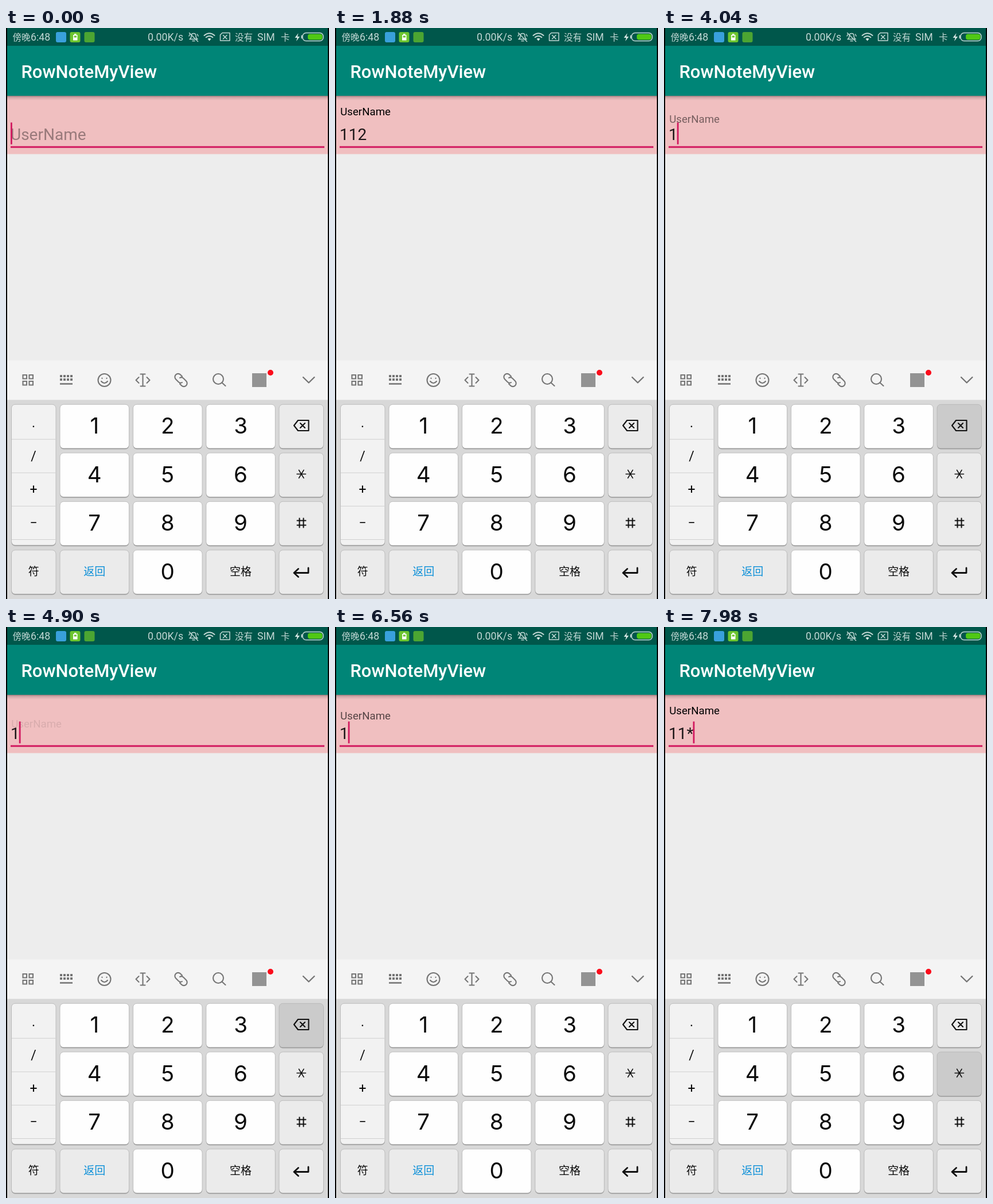
Write an HTML page that moves like this. It is 563 px wide and 994 px high and loops after 8 s.

```html
<!DOCTYPE html>
<html lang="zh">
<head>
<meta charset="utf-8">
<title>Floating label</title>
<style>
  html, body { margin: 0; width: 100%; height: 100%; overflow: hidden; background: #000; }
  svg { display: block; width: 563px; height: 994px; font-family: Roboto, "Noto Sans CJK SC", "Noto Sans CJK", sans-serif; }
  .line { fill: none; stroke-linecap: round; stroke-linejoin: round; }
  .status { fill: #c4d8d5; font-size: 17.7px; }
  .han { font-size: 15.6px; }
  .key { stroke: #b4b4b4; stroke-width: .8; }
  .digit { font: 400 38.5px Inter, sans-serif; }
  .digit, .word, .sign { text-anchor: middle; fill: #0a0a0a; }
  .word { font-size: 19px; }
  .sign { font-size: 23px; }
</style>
</head>
<body>
<svg viewBox="0 0 563 994" xmlns="http://www.w3.org/2000/svg">
  <defs>
    <linearGradient id="shade" x2="0" y2="1">
      <stop offset="0" stop-opacity=".36"/>
      <stop offset=".35" stop-opacity=".13"/>
      <stop offset="1" stop-opacity="0"/>
    </linearGradient>
  </defs>
  <rect width="563" height="994"/>
  <rect x="2" width="559" height="994" fill="#ededed"/>

  <!-- form -->
  <rect x="2" y="118" width="559" height="101.5" fill="#f0bfc0"/>
  <rect x="2" y="118" width="559" height="8" fill="url(#shade)"/>
  <text id="hint" x="8" y="195" font-size="28" fill-opacity=".36">UserName</text>
  <text id="value" x="8" y="195" font-size="28" fill="#1d1718"></text>
  <rect x="8" y="205.7" width="547" height="3" fill="#d2195f"/>
  <text id="label" x="9.2" y="152.4" font-size="18.7">UserName</text>
  <rect id="cursor" y="164.5" width="2.8" height="38" fill="#d2195f"/>

  <!-- bars -->
  <rect x="2" width="559" height="31" fill="#00574b"/>
  <rect x="2" y="31" width="559" height="87" fill="#008577"/>
  <text x="26.5" y="87" font-size="31" font-weight="500" fill="#fff">RowNoteMyView</text>

  <g class="status">
    <text class="han" x="11.5" y="21.5">傍晚</text>
    <text x="43" y="22">6:48</text>
    <text x="247" y="22">0.00K/s</text>
    <text class="han" x="399" y="21.5">没有</text>
    <text x="438" y="22">SIM</text>
    <text class="han" x="479" y="21.5">卡</text>
  </g>
  <rect x="87" y="7" width="18" height="18" rx="3" fill="#39a0dc"/>
  <rect x="111.5" y="7" width="18" height="18" rx="3" fill="#6cc52f"/>
  <path d="M117 12h2v-2h3.5v2h2v9.5h-7.5z" fill="#fff"/>
  <path d="M118.5 13.5h4.500v3h-4.500z" fill="#6cc52f"/>
  <rect x="136.5" y="7" width="18" height="18" rx="3" fill="#4ca532"/>
  <g class="line" stroke="#c4d8d5" stroke-width="1.5">
    <path d="M320 19.500q3-1.500 3-6 0-4 4-4t4 4q0 4.500 3 6zM325 22.500h4M319.500 8.500l15 15M320.500 11l-1.500 3M333.500 11l1.500 3"/>
    <path d="M345.500 13q9-7.500 18 0M348.700 16.300q5.800-4.500 11.600 0" stroke-width="2"/>
    <path d="M377 8.500h13v13.500h-16.500v-10zM378.500 12.500l6.500 6.500M385 12.500l-6.500 6.500"/>
    <rect x="517" y="8.5" width="36" height="14" rx="6"/>
    <path d="M515.500 13.500v4" stroke-width="2"/>
  </g>
  <path d="M351.500 19q3-2.500 6 0l-3 3.500zM509.500 9l-6 8h4l-1.500 6 6-8h-4z" fill="#d6e6e3"/>
  <rect x="526" y="10.5" width="25.5" height="10" rx="4" fill="#50c814"/>

  <!-- toolbar -->
  <rect x="2" y="578.5" width="559" height="69" fill="#f4f4f4"/>
  <g class="line" stroke="#757575" stroke-width="2.1">
    <path d="M29.500 604h6.500v6.500h-6.500zM40.500 604h6.500v6.500h-6.500zM29.500 615h6.500v6.500h-6.500zM40.500 615h6.500v6.500h-6.500z" stroke-linejoin="miter"/>
    <path d="M94 606h22M94 612h22" stroke-width="4" stroke-dasharray="4 2" stroke-linecap="butt"/>
    <path d="M94 619.500h22" stroke-width="2.6" stroke-linecap="butt"/>
    <circle cx="171.5" cy="613" r="11"/>
    <path d="M166 615q5.500 6.500 11 0M167.500 609.500v.5M175.500 609.500v.5"/>
    <path d="M231.500 608l-5 5 5 5M245.500 608l5 5-5 5M234.500 602.500h8M234.500 623.500h8M238.500 602.500v21"/>
    <path d="M307 606.500l-3-3a5.500 5.500 0 0 0-8 8l5 5q3 2.500 6 .5M303 619.500l3 3a5.500 5.500 0 0 0 8-8l-5-5q-3-2.500-6-.5"/>
    <circle cx="370" cy="611" r="9"/>
    <path d="M376.500 617.500l6 5.500"/>
    <path d="M518 608l9.700 9.500 9.700-9.500" stroke-width="2.4"/>
  </g>
  <rect x="429" y="601" width="25" height="24" fill="#939393"/>
  <circle cx="461" cy="600" r="5" fill="#fb0d1b"/>

  <!-- keyboard -->
  <rect x="2" y="647.5" width="559" height="347" fill="#d8d8d8"/>
  <g id="keys"></g>
  <g class="line" stroke="#111" stroke-width="2.1">
    <path d="M502 692l7-9h18.500v18h-18.500zM513 688l8 8M521 688l-8 8"/>
    <path d="M507 776.500h15.500M510.500 769.500l8.500 14M519 769.500l-8.500 14" stroke-width="1.5"/>
    <path d="M507.500 857.500h15M507.500 865.500h15M511.500 853.500v16M518.500 853.500v16" stroke-width="2"/>
    <path d="M527 940v8.500h-24.500M509.500 941.500l-7.500 7 7.500 7" stroke-width="2.8"/>
  </g>
</svg>
<script>
  const LOOP = 8000, RISE = 800;
  const $ = id => document.getElementById(id);
  const keys = $('keys'), hint = $('hint'), value = $('value'), label = $('label'), cursor = $('cursor');

  function add(tag, attrs, text) {
    const node = document.createElementNS('http://www.w3.org/2000/svg', tag);
    for (const name in attrs) node.setAttribute(name, attrs[name]);
    if (text) node.textContent = text;
    return keys.appendChild(node);
  }
  function addKey(x, y, w, h, fill) {
    add('rect', { x, y: y + 1.4, width: w, height: h, rx: 6.5, fill: '#929292' });
    return add('rect', { class: 'key', x, y, width: w, height: h, rx: 6.5, fill });
  }

  const cols = [[9.5, 77.5], [94, 120.5], [221.5, 120.5], [348.8, 120.5], [476, 77.5]];
  const rowY = r => 655.3 + r * 84.5;
  const WHITE = '#fefefe', GREY = '#ebebeb', DOWN = '#cbcbcb';
  const words = { 符: '符', 返: '返回', 空: '空格' };
  const caps = {};

  addKey(9.5, 655.3, 77.5, 245, '#f2f2f2');
  [716, 774.3, 832.3, 890.5].forEach(y =>
    add('rect', { x: 10, y: y - .5, width: 76.5, height: 1, fill: '#d0d0d0' }));
  ['.', '/', '+', '−'].forEach((s, i) => add('text', { class: 'sign', x: 48, y: 695 + i * 58 }, s));

  ['123<', '456*', '789#', '符返0空~'].forEach((row, r) => {
    [...row].forEach((id, i) => {
      const [x, w] = cols[r < 3 ? i + 1 : i];
      const digit = /\d/.test(id), fill = digit ? WHITE : GREY, mid = x + w / 2;
      caps[id] = { rect: addKey(x, rowY(r), w, 76.5, fill), fill };
      if (digit) add('text', { class: 'digit', x: mid, y: rowY(r) + 51 }, id);
      if (words[id]) {
        const word = add('text', { class: 'word', x: mid, y: rowY(r) + 44.2 }, words[id]);
        if (id === '返') word.style.fill = '#0a8fd8';
      }
    });
  });

  // key, down, up; the text changes on release
  const taps = [
    ['1', 400, 510], ['1', 960, 1080], ['2', 1360, 1380],
    ['<', 2230, 2300], ['<', 2410, 2480], ['<', 2620, 2640],
    ['1', 3540, 3620], ['<', 4020, 4270], ['1', 4700, 4820], ['<', 4870, 5150],
    ['1', 5950, 6065], ['1', 6640, 6720], ['2', 7080, 7180],
    ['<', 7260, 7430], ['*', 7780, 7830], ['*', 7980, 8100]
  ];

  // time and linear progress of the label
  const path = [
    [0, 0], [436, 0], [436 + RISE, 1], [2624, 1], [2624 + RISE, 0],
    [3640, 0], [4270, .79], [4820, .1], [5150, .51], [5558, 0],
    [6088, 0], [6088 + RISE, 1], [LOOP, 1]
  ];

  function progress(t) {
    const i = path.findIndex(p => p[0] > t);
    const [t0, a] = path[i - 1], [t1, b] = path[i];
    const p = a + (b - a) * (t - t0) / (t1 - t0);
    return (1 - Math.cos(Math.PI * p)) / 2;
  }

  function draw(now) {
    const t = now % LOOP;
    let text = '', edited = 0, held = '';
    for (const [id, down, up] of taps) {
      if (t >= up) {
        text = id === '<' ? text.slice(0, -1) : text + id;
        edited = up;
      } else if (t >= down) held = id;
    }
    for (const id in caps) caps[id].rect.setAttribute('fill', id === held ? DOWN : caps[id].fill);

    value.textContent = text;
    hint.style.display = text ? 'none' : '';
    cursor.setAttribute('x', Math.max(8, 7 + (text ? value.getComputedTextLength() : 0)));
    cursor.style.display = (t - edited) % 1000 < 500 ? '' : 'none';

    const f = progress(t);
    label.setAttribute('transform', `translate(0 ${(25 * (1 - f)).toFixed(2)})`);
    label.setAttribute('fill-opacity', f);
    requestAnimationFrame(draw);
  }
  requestAnimationFrame(draw);
</script>
</body>
</html>
```
